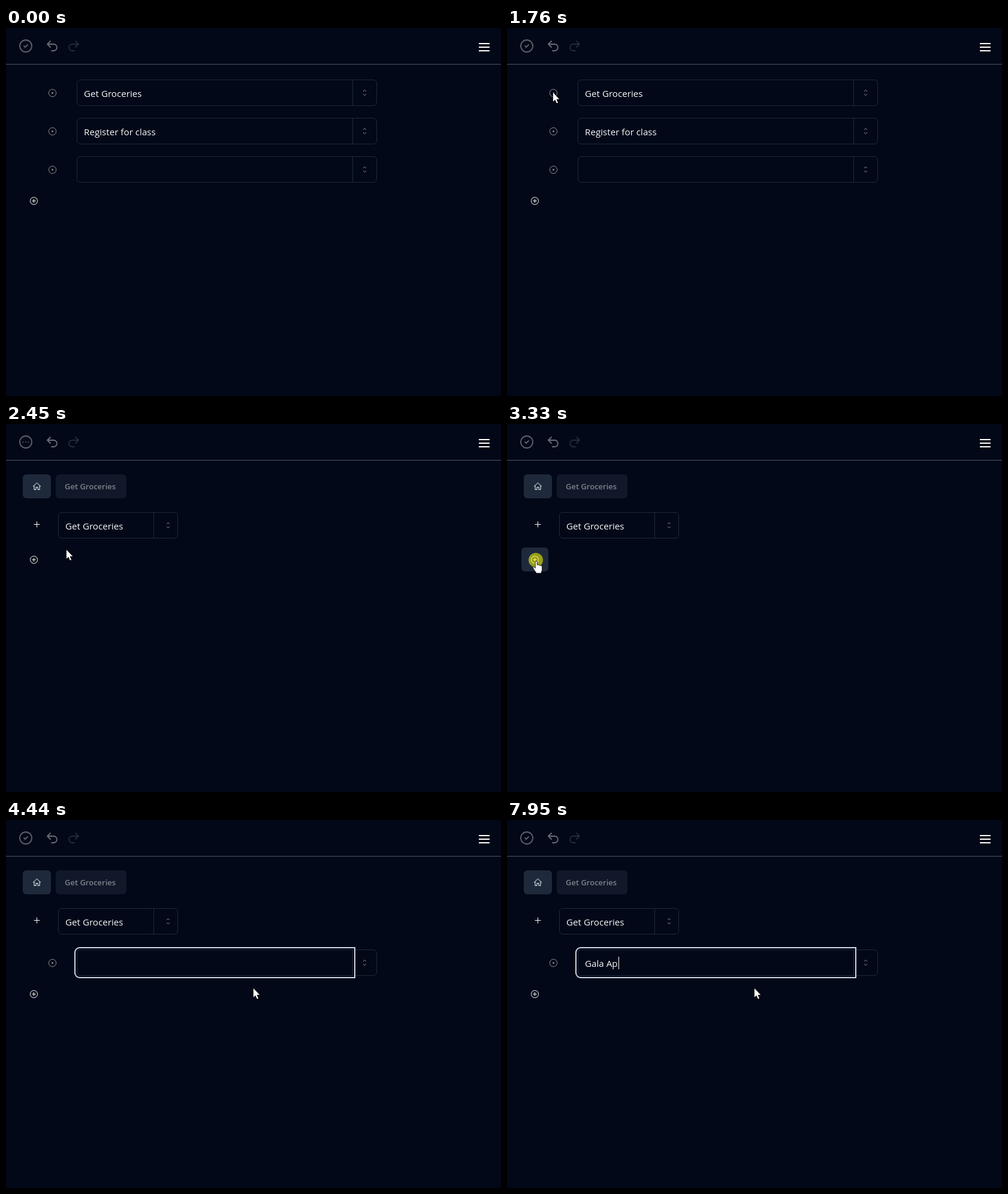
An HTML page for the animation above (8000 ms loop, 826 px wide and 614 px high).

```html
<!DOCTYPE html>
<html lang="en">
<head>
<meta charset="utf-8">
<title>Task list</title>
<style>
  html, body { margin: 0; width: 100%; height: 100%; overflow: hidden; background: #020817; }
  svg { display: block; }
  text { font: 15.2px "Open Sans", "Noto Sans", sans-serif; fill: #f8fafc; white-space: pre; }
  .crumb { font-size: 13px; font-weight: 600; }
  .line { fill: none; stroke: #f8fafc; }
  .edge { fill: none; stroke: #1e293b; }
  .lucide { stroke-width: 1.8; stroke-linecap: round; stroke-linejoin: round; }
  .cursor { fill: #fff; stroke: #000; stroke-linejoin: round; }
</style>
</head>
<body>
<svg id="stage" width="826" height="614" viewBox="0 0 826 614"></svg>
<script>
const LOOP = 8000, STEP = 70;
const OPEN = 1830, ADDED = 3470, FOCUS = 3890, BLINK = 530;

// Interface parts
const at = (x, y, body, attrs = '') => `<g transform="translate(${x} ${y})" ${attrs}>${body}</g>`;
const line = (d, attrs = '') => `<path class="line" d="${d}" ${attrs}/>`;

const lucide = (x, y, body, opacity) => at(x, y, body, `class="line lucide" opacity="${opacity}"`);

const field = (x, y, w, label, iconX) => `
  <rect class="edge" x="${x + .5}" y="${y + .5}" width="${w - 1}" height="43" rx="5.5"/>
  <path class="edge" d="M${x + w - 40.5} ${y}v44"/>
  <text x="${x + 12}" y="${y + 29}">${label}</text>
  ${at(iconX, y + 22, line('M-2.5-2.2 0-4.5 2.5-2.2M-2.5 2.2 0 4.5 2.5 2.2', 'opacity=".55"'))}`;

const task = (y, label) => field(118, y, 501, label, 598.5) + at(77.5, y + 22.5,
  '<circle class="line" r="6.2"/><circle r="1.4" fill="#f8fafc"/>', 'opacity=".55"');

const addIcon = '<circle class="line" r="6.1"/>' + line('M-3.2 0h6.4M0-3.2v6.4');

const header = `
  <path d="M0 60.5h826" stroke="#475569"/>
  ${lucide(21, 18, '<circle cx="12" cy="12" r="10"/>', .38)}
  ${lucide(21, 18, '<path id="saved" d="m9 12 2 2 4-4"/><path id="saving" d="M7.5 12h.01M12 12h.01M16.5 12h.01"/>', .38)}
  ${lucide(65, 18, '<path d="M9 14 4 9l5-5M4 9h10.5a5.5 5.5 0 0 1 0 11H11"/>', .42)}
  ${lucide(101, 18, '<path d="m15 14 5-5-5-5M20 9H9.5a5.5 5.5 0 0 0 0 11H13"/>', .15)}
  <path d="M789 26h18M789 32h18M789 38h18" stroke="#fff" stroke-width="2"/>`;

const list = `<g id="list">
  ${task(86, 'Get Groceries')}${task(150, 'Register for class')}${task(214, '')}
  ${at(46.5, 288.5, addIcon)}</g>`;

const detail = `<g id="detail">
  <rect x="28" y="84" width="47" height="40" rx="6" fill="#1e293b"/>
  ${at(51.5, 104, line('M-6.5 .3 0-5.8 6.5.3M-4.5-1.2V5.5h3V1.5h3v4h3V-1.2', 'stroke-linejoin="round"'))}
  <g opacity=".5">
    <rect x="83" y="84" width="118" height="40" rx="6" fill="#1e293b"/>
    <text class="crumb" x="98" y="109">Get Groceries</text>
  </g>
  ${line('M46.5 167.5h10M51.5 162.5v10')}
  ${field(87, 147, 200, 'Get Groceries', 270.5)}
  <g id="added">${task(216, '')}
    <g id="focus">
      <path d="M582 213H123a8 8 0 0 0-8 8v34a8 8 0 0 0 8 8H582z" fill="none" stroke="#cbd5e1" stroke-width="2"/>
      <path d="M579.5 214v48" stroke="#020817" stroke-width="3"/>
      <path class="edge" d="M578.5 216v44"/>
      <text id="typed" x="130" y="245"></text>
      <rect id="caret" y="228" width="1" height="21" fill="#fff"/>
    </g>
  </g>
  <g id="add">
    <rect id="hover" x="24" y="-20" width="45" height="40" rx="6" fill="#1e293b"/>
    ${at(46.5, .5, addIcon)}
  </g></g>`;

const pointer = `
  <circle id="click" cx="48" cy="227" r="12" fill="#ff0"/>
  <g id="pointer" class="cursor">
    <path id="arrow" d="M.5 0V16.6L4.2 13.2 6.7 19 9.5 17.8 7 12.1H12z" stroke-width=".8"/>
    <path id="hand" stroke-width=".8" d="M-.8 2C-.8 .2 2.2 .2 2.2 2V7.2C3 6.3 4.8 6.6 5 7.8 6 7 7.6 7.4 7.8 8.6 9 8 10.6 8.6 10.6 10V15C10.6 17 9.4 18.4 9 21H.8C.4 18.8-2 17-3.2 14.4L-4.7 12C-5.4 10.6-3.6 9.6-2.4 10.8L-.8 12.6z"/>
    <path id="beam" fill="none" stroke="#fff" d="M-3-9.5h2.3L0-9 .7-9.5H3M0-9V9M-3 9.5h2.3L0 9 .7 9.5H3"/>
  </g>`;

const stage = document.getElementById('stage');
stage.innerHTML = header + list + detail + pointer;
const el = {};
stage.querySelectorAll('[id]').forEach(node => el[node.id] = node);

// Pointer moves: start time, step count, points spread evenly over the steps
const moves = [
  [190, 10, [[748, 604], [470, 372], [230, 205], [150, 146], [126.5, 130]]],
  [1080, 7, [[119, 127], [98, 117], [82, 109], [76, 107]]],
  [2030, 13, [[82, 114], [108, 130], [138, 152], [150, 170], [145, 186], [124, 199], [100, 209],
              [80, 215], [66, 219], [57, 222], [52, 224], [49, 225], [48, 228]]],
  [3540, 4, [[62, 229], [120, 234], [205, 240], [260, 243]]],
  [3960, 6, [[285, 247], [345, 261], [390, 273], [411.5, 279.5]]],
];

// Typing: time of each key and the text after it
const keys = [[FOCUS, ''], [6690, 'G'], [6960, 'Ga'], [7050, 'Gal'], [7130, 'Gala'],
              [7220, 'Gala '], [7850, 'Gala A'], [7950, 'Gala Ap']];
const savingSpans = [[OPEN, 2730], [ADDED, 4310], [6690, 7750]];

const clamp = v => Math.max(0, Math.min(1, v));
const latest = (rows, t) => rows.filter(row => row[0] <= t).pop();
const inside = ([x, y], l, t, r, b) => x >= l && x <= r && y >= t && y <= b;
const show = (node, on) => node.style.display = on ? '' : 'none';

function pointerAt(t) {
  const move = latest(moves, t);
  if (!move) return null;
  const [start, steps, points] = move;
  const k = Math.min(steps - 1, Math.floor((t - start) / STEP));
  const u = k / (steps - 1) * (points.length - 1);
  const i = Math.min(points.length - 2, Math.floor(u));
  return points[i].map((v, axis) => v + (points[i + 1][axis] - v) * (u - i));
}

function pointerKind(p, t) {
  if (t < OPEN) {
    if ([86, 150, 214].some(y => inside(p, 118, y, 578, y + 44))) return 'beam';
    return t < 1760 && inside(p, 55, 88, 98, 128) ? 'hand' : 'arrow';
  }
  if (inside(p, 87, 147, 246, 191)) return 'beam';
  if (t >= ADDED) return inside(p, 118, 216, 578, 260) ? 'beam' : 'arrow';
  return inside(p, 24, 206, 69, 246) ? 'hand' : 'arrow';
}

function draw(t) {
  show(el.list, t < OPEN);
  show(el.detail, t >= OPEN);
  show(el.added, t >= ADDED);
  show(el.focus, t >= FOCUS);

  const saving = savingSpans.some(([a, b]) => t >= a && t < b);
  show(el.saving, saving);
  show(el.saved, !saving);

  el.add.setAttribute('transform', `translate(0 ${t < ADDED ? 226 : 290})`);
  el.hover.setAttribute('opacity', t < ADDED ? clamp((t - 2590) / 150) : 1 - clamp((t - ADDED) / 150));

  const key = latest(keys, t);
  if (key) {
    el.typed.textContent = key[1];
    el.caret.setAttribute('x', 131 + Math.round(key[1] ? el.typed.getComputedTextLength() : 0));
    const since = t - key[0] + (key[1] ? 0 : -20);
    show(el.caret, Math.floor(Math.max(0, since + (key[1] ? 0 : 20 )) / BLINK) % 2 === 0 && t >= FOCUS);
  }

  el.click.setAttribute('opacity', t >= 3330 && t < 3400 ? .55 : t >= 3400 && t < ADDED ? .3 : 0);

  const p = pointerAt(t);
  show(el.pointer, p);
  if (p) {
    const kind = pointerKind(p, t);
    for (const name of ['arrow', 'hand', 'beam']) show(el[name], name === kind);
    const [x, y] = p.map(Math.round);
    el.pointer.setAttribute('transform', `translate(${kind === 'beam' ? x - .5 : x} ${y})`);
  }
}

const begin = performance.now();
function tick() {
  draw((performance.now() - begin) % LOOP);
  requestAnimationFrame(tick);
}
tick();
</script>
</body>
</html>
```
